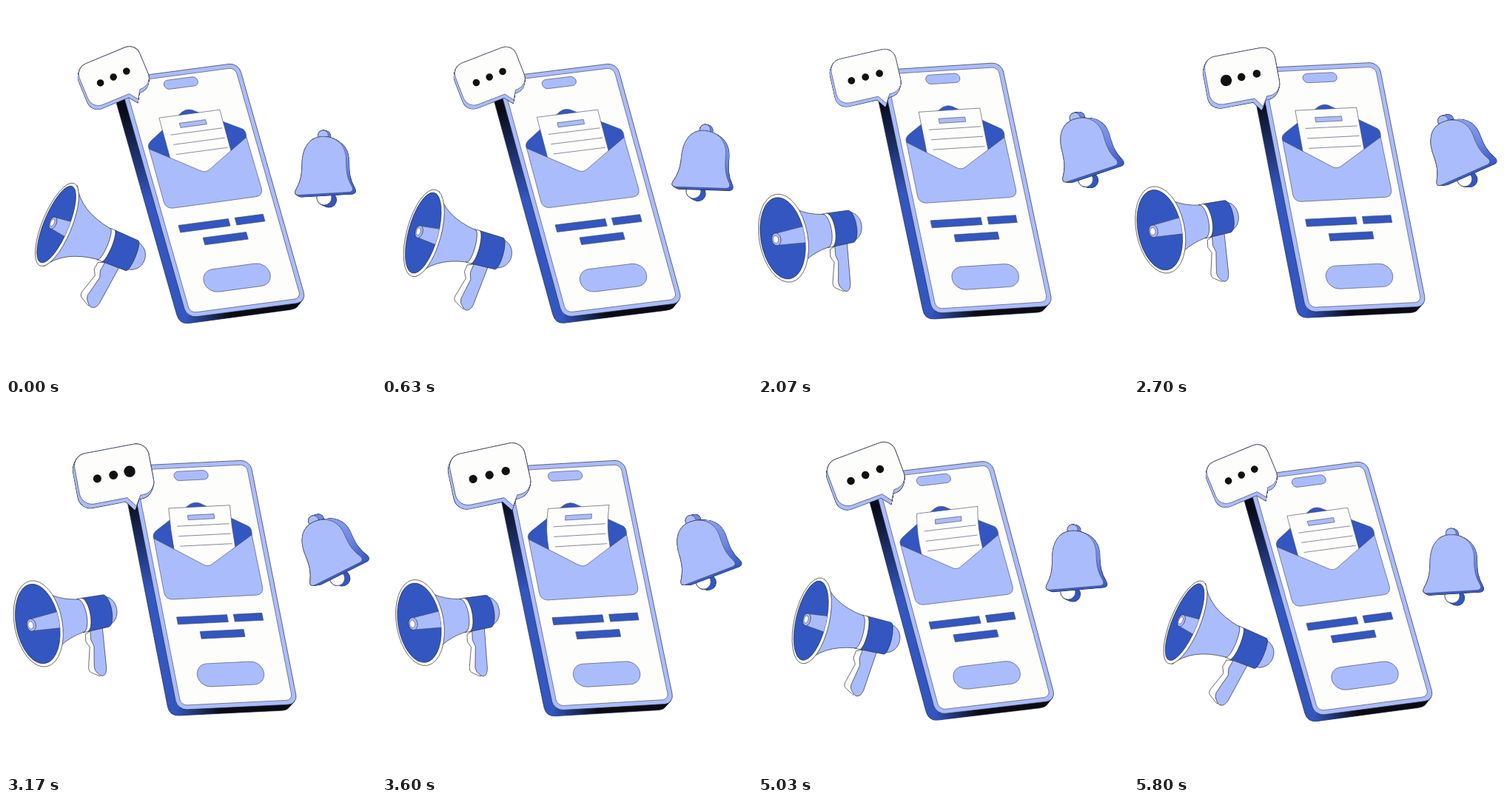
Write an HTML page that moves like this. It is 500 px wide and 500 px high and loops after 5.83 s.

```html
<!DOCTYPE html>
<html lang="en">
<head>
<meta charset="utf-8">
<title>Notifications</title>
<style>
html, body { margin: 0; width: 100%; height: 100%; overflow: hidden; background: #fff; }
svg { display: block; width: 100vw; height: 100vh; }
.light { fill: #abbcfd; }
.dark { fill: #3356c0; }
.paper { fill: #fdfdfc; }
.edge { stroke: #2a2d3a; stroke-width: .65; stroke-linejoin: round; }
.thin { stroke: #4b5066; stroke-width: .65; stroke-linejoin: round; }
.none { fill: none; }
</style>
</head>
<body>
<svg viewBox="0 0 500 500">
  <defs>
    <linearGradient id="sideLeft" gradientUnits="userSpaceOnUse" x1="0" y1="45" x2="0" y2="170">
      <stop offset="0" stop-color="#080b18"/><stop offset="1" stop-color="#3356c0"/>
    </linearGradient>
    <linearGradient id="sideBottom" gradientUnits="userSpaceOnUse" x1="-3" y1="0" x2="58" y2="0">
      <stop offset="0" stop-color="#3356c0"/><stop offset="1" stop-color="#0a0b12"/>
    </linearGradient>
    <linearGradient id="bellSide" gradientUnits="userSpaceOnUse" x1="0" y1="-40" x2="8" y2="42">
      <stop offset="0" stop-color="#8fa4f5"/><stop offset=".55" stop-color="#6d86e2"/><stop offset="1" stop-color="#3356c0"/>
    </linearGradient>
  </defs>
  <g id="phone">
    <g transform="matrix(.991 -.132 .274 .962 152.5 98)">
      <path class="edge" fill="url(#sideLeft)" d="M3 4L-9 12Q-12.2 15-12.2 21V330Q-12.2 343.7.8 343.7H138Q146 343.7 149 341L159.5 332Z"/>
      <path fill="url(#sideBottom)" d="M-5 342Q-2 343.5 1 343.5H138Q146 343.5 149 341L159.5 332 5 332Z"/>
      <rect class="light edge" width="163" height="336" rx="13"/>
      <rect class="paper thin" x="6" y="6" width="151" height="324" rx="8.5"/>
      <rect class="light thin" x="57" y="10.8" width="46" height="12.6" rx="6.3"/>
      <rect class="dark thin" x="23.4" y="209.3" width="68" height="10"/>
      <rect class="dark thin" x="100.3" y="209.3" width="38.5" height="10"/>
      <rect class="dark thin" x="51" y="230.5" width="59" height="10"/>
      <rect class="light thin" x="35.8" y="274.8" width="90" height="31.6" rx="15.8"/>
    </g>
    <path class="dark thin" d="M194 194Q190 188 196 182L238 143Q246 137 256 142L320 166Q325 169 325 178L270 224Z"/>
    <g id="letter"></g>
    <path class="light thin" d="M193.500 193L262 222Q270 226 276 220L325 177 345.500 247Q347 256 338 257.500L225 273Q216 273 213.500 265Z"/>
  </g>
  <g id="bubble"></g>
  <g id="bell"></g>
  <g id="horn"></g>
</svg>
<script>
const LOOP = 5830;
const part = id => document.getElementById(id);

// Mean plus harmonics of the loop angle
const wave = (a, mean, cos, sin = []) =>
  cos.reduce((sum, c, i) => sum + c * Math.cos((i + 1) * a), mean) +
  sin.reduce((sum, s, i) => sum + s * Math.sin((i + 1) * a), 0);

function ease(from, to, t) {
  const u = Math.min(1, Math.max(0, (t - from) / (to - from)));
  return u * u * (3 - 2 * u);
}

// Outlined solid: a shape swept along (dx, dy)
function solid(d, dx, dy, side, front) {
  const sweep = style => Array.from({ length: 9 }, (_, i) =>
    `<path d="${d}" transform="translate(${dx * i / 8} ${dy * i / 8})" ${style}/>`).join('');
  return sweep('class="none" stroke="#2a2d3a" stroke-width="1.1"') + sweep(`fill="${side}"`) +
    `<path d="${d}" class="${front} thin"/>`;
}
const disc = (x, y, r) => `M${x - r} ${y}a${r} ${r} 0 1 1 ${2 * r} 0a${r} ${r} 0 1 1 ${-2 * r} 0Z`;
const ellipse = (x, rx, ry, cls) => `<ellipse cx="${x}" rx="${rx}" ry="${ry}" class="${cls}"/>`;

function place(id, x, y, turn, content, scale = 1) {
  part(id).setAttribute('transform', `translate(${x} ${y}) rotate(${turn}) scale(${scale})`);
  part(id).innerHTML = content;
}

function drawLetter(sway) {
  const at = (a, b, bend = sway * Math.max(0, 1 - b) ** 2) =>
    `${207 + 82 * a + 15 * b + bend} ${151 - 11 * a + 55 * b - bend * .13}`;
  const rule = b => `M${at(.11, b)}L${at(.96, b)}`;
  return `<path class="paper thin" d="M${at(0, 0)}Q${at(0, .5, 0)} ${at(0, 1)}L${at(0, 1.5)} ${at(1, 1.5)} ${at(1, 1)}Q${at(1, .5, 0)} ${at(1, 0)}Z"/>` +
    `<path class="light thin" d="M${at(.3, .19)}L${at(.73, .19)} ${at(.73, .3)} ${at(.3, .3)}Z"/>` +
    `<path class="none thin" d="${rule(.44)}${rule(.68)}${rule(.92)}"/>`;
}

function drawBubble(t) {
  const shape = 'M-28-31H30a15 15 0 0 1 15 15V14a15 15 0 0 1-15 15H26.500L19.500 40.500 11 29H-28a15 15 0 0 1-15-15V-16a15 15 0 0 1 15-15Z';
  const dots = [-1, 0, 1].map(i => {
    const peak = 2970 + i * 270;
    const r = 4.8 + 2.2 * ease(peak - 270, peak, t) * ease(peak + 270, peak, t);
    return `<circle cx="${19.3 * i}" cy="${-.6 * i}" r="${r}" fill="#101012"/>`;
  });
  return solid(shape, -2.6, 4.2, '#abbcfd', 'paper') + dots.join('');
}

function drawBell(clapper, depth) {
  const body = 'M-2-36.500C17-36.500 28-24 29-8C29 10 30 19 37 31Q40 37 34 38.500L-35 42.500Q-42 42-39 36C-33 25-31 18-30.500 4C-31-22-20-36.500-2-36.500Z';
  return solid(disc(-2, -38, 7), depth * .8, 1, '#6d86e2', 'light') +
    solid(disc(clapper, 46, 10), 6.500, 3, '#3356c0', 'paper') +
    solid(body, depth, 2.5, 'url(#bellSide)', 'light');
}

function drawHorn(rx, ry) {
  const k = (161.4 - 1.62 * rx) / 129.5;
  const bulge = 15 * rx / ry;
  const pts = list => list.map(([x, y]) => `${x * k} ${y}`).join(' ');
  const path = (cls, d) => `<path class="${cls} edge" d="${d}"/>`;
  const tube = (x0, x1, h0, h1) =>
    `M${x0 * k} ${-h0}L${x1 * k} ${-h1}A${bulge} ${h1} 0 0 1 ${x1 * k} ${h1}L${x0 * k} ${h0}A${bulge} ${h0} 0 0 0 ${x0 * k} ${-h0}Z`;
  const nose = -.3 * rx, inner = [rx - 3.2, ry - 4.5];
  return path('paper', `M${pts([[82, 22], [71, 26], [69.5, 36], [74, 44], [66, 71]])}Q${pts([[65, 77], [70, 79]])}L${pts([[81, 85], [90, 80], [98, 22]])}Z`) +
    path('light', `M${pts([[80, 20], [78, 35], [81, 44], [75, 72]])}Q${pts([[75, 78], [79, 81]])}Q${pts([[84, 87], [88, 85]])}Q${pts([[92, 84], [94, 76]])}L${pts([[100, 20]])}Z`) +
    path('light', `M${106 * k} -20C${pts([[121, -20], [128, -10], [128, 0]])}C${pts([[128, 10], [121, 20], [106, 20]])}Z`) +
    path('dark', tube(75, 110, 23, 22)) +
    path('paper', tube(68, 75, 23, 23)) +
    path('light', `M${5 * k} ${1 - ry}Q${22 * k} -29 ${69 * k} -22.500A${bulge} 22.500 0 0 1 ${69 * k} 22.500Q${22 * k} 29 ${5 * k} ${ry - 1}Z`) +
    ellipse(0, rx, ry, 'paper edge') + ellipse(-1, ...inner, 'dark edge') +
    `<clipPath id="mouth">${ellipse(-1, ...inner, '')}</clipPath>` +
    `<path clip-path="url(#mouth)" class="light thin" d="M${nose} -8L${rx} -11.500V11.500L${nose} 8Z"/>` +
    ellipse(nose, 2.5 + rx * .11, 8.5, 'light edge') + ellipse(nose - .8, 1 + rx * .08, 5.2, 'paper thin');
}

function render(t) {
  const a = t / LOOP * 2 * Math.PI;
  const lean = (1 - Math.cos(a)) / 2;
  const settle = ease(4400, 5800, t);

  part('phone').setAttribute('transform',
    `translate(${wave(a, 275.5, [-1.6], [2.1])} ${wave(a, 233.3, [2.4], [.5])}) rotate(${4.9 * lean}) translate(-274 -235.5)`);
  part('letter').innerHTML = drawLetter(13 * (ease(2800, 4000, t) - settle));

  place('bubble', 145.2, 96, -22.5 + 12 * lean, drawBubble(t), 1 + .175 * (ease(1800, 3500, t) - settle));

  place('bell',
    wave(a, 433.4, [-1, -1.9], [8.5, 0, -2.7]),
    wave(a, 198.2, [11, 3.8], [-4]),
    wave(a, -12, [12, 5, 0, -5], [0, 0, 2.5]),
    drawBell(wave(a, -5.5, [0, 0, 0, 5]), wave(a, 6.5, [-2.5])));

  place('horn',
    wave(a, 53.5, [15, .5], [-11.5, 0, -1.5]),
    wave(a, 302.2, [-2, -4.8], [11.5]),
    wave(a, 2, [16.8, 3.65], [-.9]),
    drawHorn(wave(a, 28, [-6.25, -1.75], [.75]), wave(a, 59.7, [.5], [1])));
}

const start = performance.now();
function tick() {
  render((performance.now() - start) % LOOP);
  requestAnimationFrame(tick);
}
tick();
</script>
</body>
</html>
```
